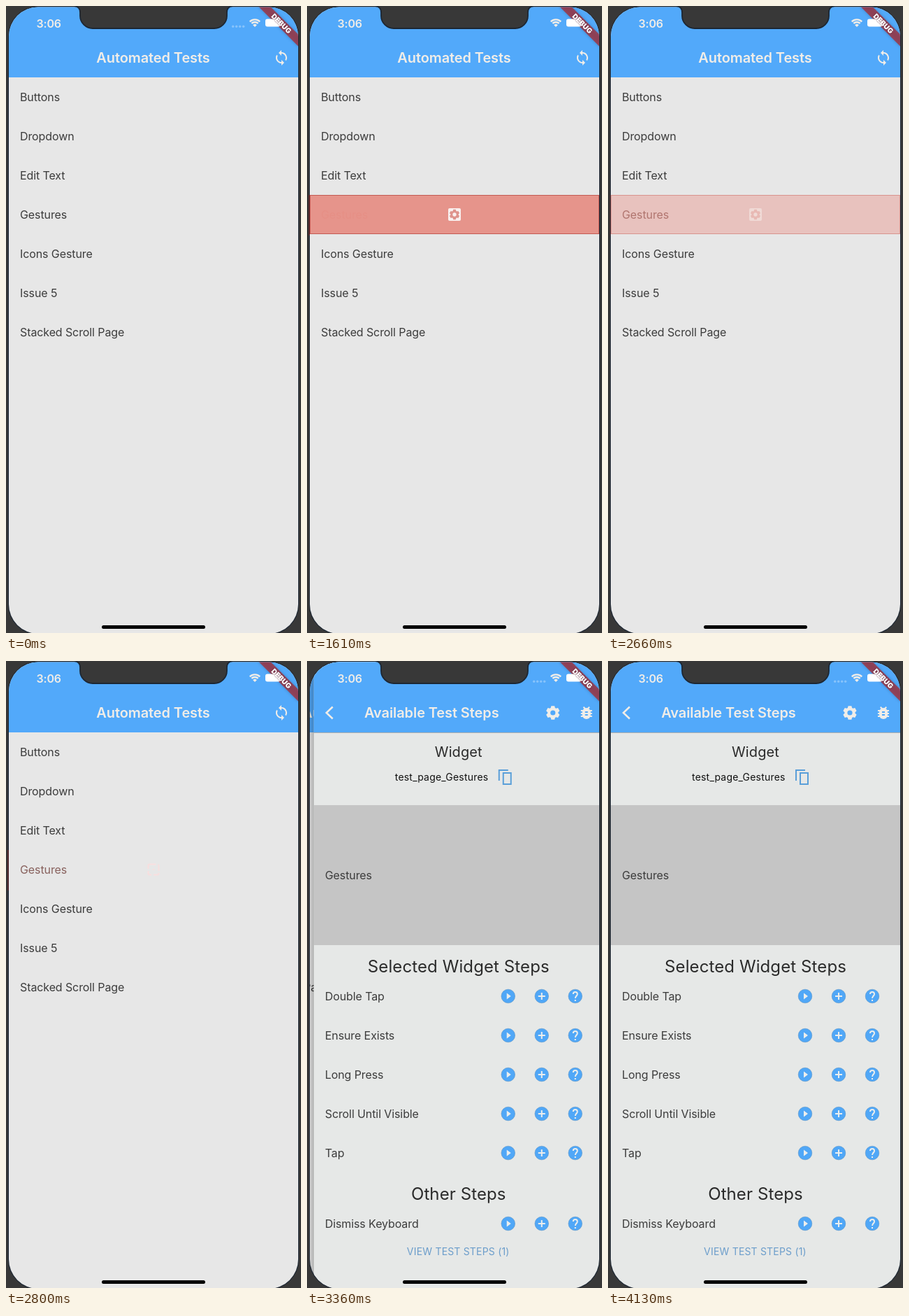
These frames come from a looping animation (422 by 896 pixels, 4200 ms). An HTML page with a canvas:

```html
<!DOCTYPE html>
<html lang="en">
<head>
<meta charset="utf-8">
<title>Automated Tests</title>
<style>
  html, body { margin: 0; width: 100%; height: 100%; overflow: hidden; background: #383838; }
  canvas { display: block; width: 422px; height: 896px; }
</style>
</head>
<body>
<canvas id="stage"></canvas>
<script>
const W = 422, H = 896, LOOP = 4200;
const LEFT = 4, RIGHT = 418, PAGE = RIGHT - LEFT;
const BEZEL = '#383838', RIM = '#1d2733';
const BLUE = '#52a9fa', COPY = '#5a9fd9', HEAD = '#2a2a2a';
const DARK = [60, 60, 60], RED = [231, 143, 134];
const css = c => `rgb(${c})`;
const FONT = 'Inter, Roboto, sans-serif';

const canvas = document.getElementById('stage');
const ctx = canvas.getContext('2d');
const dpr = window.devicePixelRatio || 1;
canvas.width = W * dpr;
canvas.height = H * dpr;

const clamp = v => Math.min(1, Math.max(0, v));
const ramp = (t, from, to) => clamp((t - from) / (to - from));
const mix = (a, b, k) => css(a.map((v, i) => Math.round(v + (b[i] - v) * k)));

// cubic-bezier(.4, 0, .2, 1)
function fastOutSlowIn(x) {
  if (x <= 0 || x >= 1) return clamp(x);
  let lo = 0, hi = 1, s = 0.5;
  for (let i = 0; i < 24; i++) {
    s = (lo + hi) / 2;
    const q = 1 - s;
    if (1.2 * q * q * s + 0.6 * q * s * s + s * s * s < x) lo = s; else hi = s;
  }
  return 3 * (1 - s) * s * s + s * s * s;
}

function text(str, x, y, size, color, { weight = 400, align = 'left', gap = -0.1 } = {}) {
  ctx.font = `${weight} ${size}px ${FONT}`;
  ctx.letterSpacing = gap + 'px';
  ctx.textAlign = align;
  ctx.fillStyle = color;
  ctx.fillText(str, x, y);
}

function rect(x, y, w, h, color) {
  ctx.fillStyle = color;
  ctx.fillRect(x, y, w, h);
}

function pill(x, y, w, h, r, color) {
  ctx.beginPath();
  ctx.roundRect(x, y, w, h, r);
  ctx.fillStyle = color;
  ctx.fill();
}

function line(points, width, color) {
  ctx.beginPath();
  points.forEach(([x, y]) => ctx.lineTo(x, y));
  ctx.lineWidth = width;
  ctx.strokeStyle = color;
  ctx.stroke();
}

function at(x, y, draw) {
  ctx.save();
  ctx.translate(x, y);
  draw();
  ctx.restore();
}

function gear(x, y, r, color) {
  at(x, y, () => {
    ctx.beginPath();
    for (let i = 0; i < 6; i++) {
      [[-0.42, 0.76], [-0.24, 1], [0.24, 1], [0.42, 0.76]].forEach(([d, k]) => {
        const a = i * Math.PI / 3 + d;
        ctx.lineTo(Math.sin(a) * r * k, -Math.cos(a) * r * k);
      });
    }
    ctx.closePath();
    ctx.moveTo(r * 0.36, 0);
    ctx.arc(0, 0, r * 0.36, 0, Math.PI * 2);
    ctx.fillStyle = color;
    ctx.fill('evenodd');
  });
}

const syncPath = new Path2D('M12 4V1L8 5l4 4V6c3.31 0 6 2.69 6 6 0 1-.25 1.97-.7 2.8l1.46 1.46' +
  'A8 8 0 0 0 12 4zm0 14c-3.31 0-6-2.69-6-6 0-1 .25-1.97.7-2.8L5.24 7.74A8 8 0 0 0 12 20v3l4-4-4-4z');

function bug(x, y, color) {
  at(x, y, () => {
    pill(-6, -7, 12, 16, 6, color);
    [-3, 1, 5].forEach(v => rect(-8, v - 1, 16, 2, color));
    line([[-4.3, -8.3], [-1.5, -5.5]], 2, color);
    line([[4.3, -8.3], [1.5, -5.5]], 2, color);
    [-2, 2].forEach(v => rect(-2, v, 4, 2, BLUE));
  });
}

function disc(x, y, draw) {
  at(x, y, () => {
    ctx.beginPath();
    ctx.arc(0, 0, 9.8, 0, Math.PI * 2);
    ctx.fillStyle = '#50a7f7';
    ctx.fill();
    ctx.lineWidth = 0.6;
    ctx.strokeStyle = '#5c94c6';
    ctx.stroke();
    draw('#eceeed');
  });
}

function play(color) {
  ctx.beginPath();
  ctx.moveTo(-2, -4.5);
  ctx.lineTo(4, 0);
  ctx.lineTo(-2, 4.5);
  ctx.fillStyle = color;
  ctx.fill();
}

function plus(color) {
  rect(-5, -1, 10, 2, color);
  rect(-1, -5, 2, 10, color);
}

function help(color) {
  ctx.beginPath();
  ctx.arc(0, -3, 3, Math.PI, Math.PI * 2.25);
  ctx.quadraticCurveTo(0, 0.8, 0, 3);
  ctx.lineWidth = 2;
  ctx.strokeStyle = color;
  ctx.stroke();
  rect(-1, 5, 2, 2, color);
}

function appBar(title, x, ink) {
  rect(LEFT, 0, PAGE, 102, BLUE);
  text(title, x, 81, 20, ink, { weight: 600, align: 'center' });
}

function overlay(alpha) {
  if (!alpha) return;
  ctx.globalAlpha = alpha;
  rect(LEFT, 270, PAGE, 56, css(RED));
  ctx.strokeStyle = '#c2574f';
  ctx.lineWidth = 1;
  ctx.strokeRect(LEFT + 0.5, 270.5, PAGE - 1, 55);
  pill(202, 289, 18, 18, 2, '#fbf7f6');
  gear(211, 298, 7.4, '#dc8d86');
  ctx.globalAlpha = 1;
}

// Faint trace left once the highlight has faded out
function trace(alpha) {
  if (!alpha) return;
  ctx.globalAlpha = alpha;
  ctx.setLineDash([9, 3]);
  ctx.beginPath();
  ctx.roundRect(203.5, 290.5, 15, 15, 2);
  ctx.strokeStyle = '#fadede';
  ctx.lineWidth = 2;
  ctx.stroke();
  ctx.setLineDash([]);
  rect(210, 297, 2, 2, '#fadede');
  ctx.globalAlpha = 1;
}

const rows = ['Buttons', 'Dropdown', 'Edit Text', 'Gestures', 'Icons Gesture', 'Issue 5', 'Stacked Scroll Page'];

function listPage(shown, rest, ink) {
  rect(LEFT, 0, PAGE, H, '#e7e7e7');
  appBar('Automated Tests', 210.5, ink);
  at(382, 62, () => {
    ctx.fillStyle = ink;
    ctx.fill(syncPath);
  });
  rows.forEach((label, i) => {
    const tint = i === 3 ? Math.max(shown, rest * 0.48) : 0;
    text(label, 20, 136 + i * 56, 16, mix(DARK, RED, tint));
  });
  overlay(shown);
  trace(rest);
}

function stepRow(label, y) {
  text(label, 20, y + 6, 16, css(DARK));
  disc(282, y, play);
  disc(330, y, plus);
  disc(378, y, help);
}

function stepsPage(ink) {
  rect(LEFT, 0, PAGE, H, '#e6e8e7');
  appBar('Available Test Steps', 172.5, ink);
  rect(LEFT, 102, PAGE, 1, 'rgba(0,0,0,.25)');
  line([[31, 65.5], [22, 74], [31, 82.5]], 2.5, ink);
  gear(346, 74, 10, ink);
  bug(394, 74, ink);

  const head = { align: 'center', gap: 0.1 };
  text('Widget', 211, 137, 20, HEAD, head);
  text('test_page_Gestures', 120, 171, 14, '#111', { gap: 0.2 });
  at(266, 154, () => {
    ctx.strokeStyle = COPY;
    ctx.lineWidth = 2;
    ctx.strokeRect(9, 6, 11, 16);
    line([[3, 17], [3, 2], [16, 2]], 2, COPY);
  });

  rect(LEFT, 206, PAGE, 200, '#c5c5c5');
  text('Gestures', 20, 312, 16, css(DARK));

  text('Selected Widget Steps', 211, 445, 24, HEAD, head);
  ['Double Tap', 'Ensure Exists', 'Long Press', 'Scroll Until Visible', 'Tap']
    .forEach((label, i) => stepRow(label, 479 + i * 56));
  text('Other Steps', 211, 770, 24, HEAD, head);
  stepRow('Dismiss Keyboard', 804);
  text('VIEW TEST STEPS (1)', 210.5, 849, 14, '#6b9dcb', { align: 'center', gap: 0.2 });
}

// The soft shadow builds up late in the slide
function edgeShadow(p) {
  const g = ctx.createLinearGradient(LEFT - 21, 0, LEFT, 0);
  [[0, 0], [0.3, 0.016], [0.6, 0.07], [1, 0.22]].forEach(([stop, a]) =>
    g.addColorStop(stop, `rgba(0,0,0,${a * p ** 4})`));
  rect(LEFT - 21, 0, 21, H, g);
  rect(LEFT - 1, 0, 1, H, 'rgba(0,0,0,.12)');
}

function onBanner(draw) {
  at(RIGHT, 1, () => {
    ctx.rotate(Math.PI / 4);
    draw();
  });
}

function bannerBand() {
  ctx.shadowColor = 'rgba(0,0,0,.35)';
  ctx.shadowBlur = 4;
  rect(-40, 28, 80, 12, 'rgba(183,28,28,.65)');
}

function bannerText() {
  ctx.shadowColor = 'rgba(90,40,60,.9)';
  ctx.shadowBlur = 2;
  text('DEBUG', 0, 37.7, 10.2, '#fff', { weight: 900, align: 'center', gap: 0 });
}

function statusBar(ink, dots) {
  text('3:06', 43.5, 30.5, 16, ink, { weight: 600, gap: -0.2 });
  if (dots) {
    for (let i = 0; i < 4; i++) pill(323 + i * 5, 27.5, 3.4, 3.4, 1.7, 'rgba(255,255,255,.3)');
  }
  ctx.strokeStyle = ink;
  ctx.lineWidth = 2.3;
  [10.2, 6.6].forEach(r => {
    ctx.beginPath();
    ctx.arc(356, 29.6, r, -Math.PI * 0.75, -Math.PI * 0.25);
    ctx.stroke();
  });
  ctx.beginPath();
  ctx.moveTo(356, 30);
  ctx.arc(356, 30, 4, -Math.PI * 0.75, -Math.PI * 0.25);
  ctx.fillStyle = ink;
  ctx.fill();
  pill(371, 18.5, 21.5, 11, 3, '#fff');
}

function screenPath() {
  ctx.beginPath();
  ctx.roundRect(LEFT, 1.5, PAGE, H - 0.5, 42);
}

function notch() {
  ctx.beginPath();
  ctx.moveTo(98, 0);
  ctx.quadraticCurveTo(106, 1, 106, 9);
  ctx.lineTo(106, 14);
  ctx.arcTo(106, 32, 124, 32, 18);
  ctx.lineTo(298, 32);
  ctx.arcTo(316, 32, 316, 14, 18);
  ctx.lineTo(316, 9);
  ctx.quadraticCurveTo(316, 1, 324, 0);
  ctx.fillStyle = BEZEL;
  ctx.fill();
  ctx.strokeStyle = RIM;
  ctx.lineWidth = 1.8;
  ctx.stroke();
}

function draw(t) {
  const shown = ramp(t, 1330, 1630) * (1 - ramp(t, 2490, 2790));
  const rest = t >= 2790 ? 1 - ramp(t, 2790, 2940) : 0;
  const slide = fastOutSlowIn(ramp(t, 3107, 3407));
  const ink = t >= 2100 && t < 2600 ? '#ffffff' : '#f0ede8';

  ctx.setTransform(dpr, 0, 0, dpr, 0, 0);
  rect(0, 0, W, H, BEZEL);
  screenPath();
  ctx.strokeStyle = RIM;
  ctx.lineWidth = 2;
  ctx.stroke();
  ctx.globalAlpha = Math.max(shown, rest) * 0.5;
  rect(2, 270, 2, 58, '#7a1d1d');
  ctx.globalAlpha = 1;

  ctx.save();
  screenPath();
  ctx.clip();
  if (slide < 1) at(-slide * PAGE / 3, 0, () => listPage(shown, rest, ink));
  if (slide > 0) {
    at((1 - slide) * PAGE, 0, () => {
      edgeShadow(slide);
      stepsPage(ink);
    });
  }
  onBanner(bannerBand);
  statusBar(ink, t < 1400 || t >= 3080);
  onBanner(bannerText);
  ctx.restore();

  notch();
  pill(137, 885, 148, 5, 2.5, '#000');
}

function tick() {
  draw(performance.now() % LOOP);
  requestAnimationFrame(tick);
}
tick();
</script>
</body>
</html>
```
